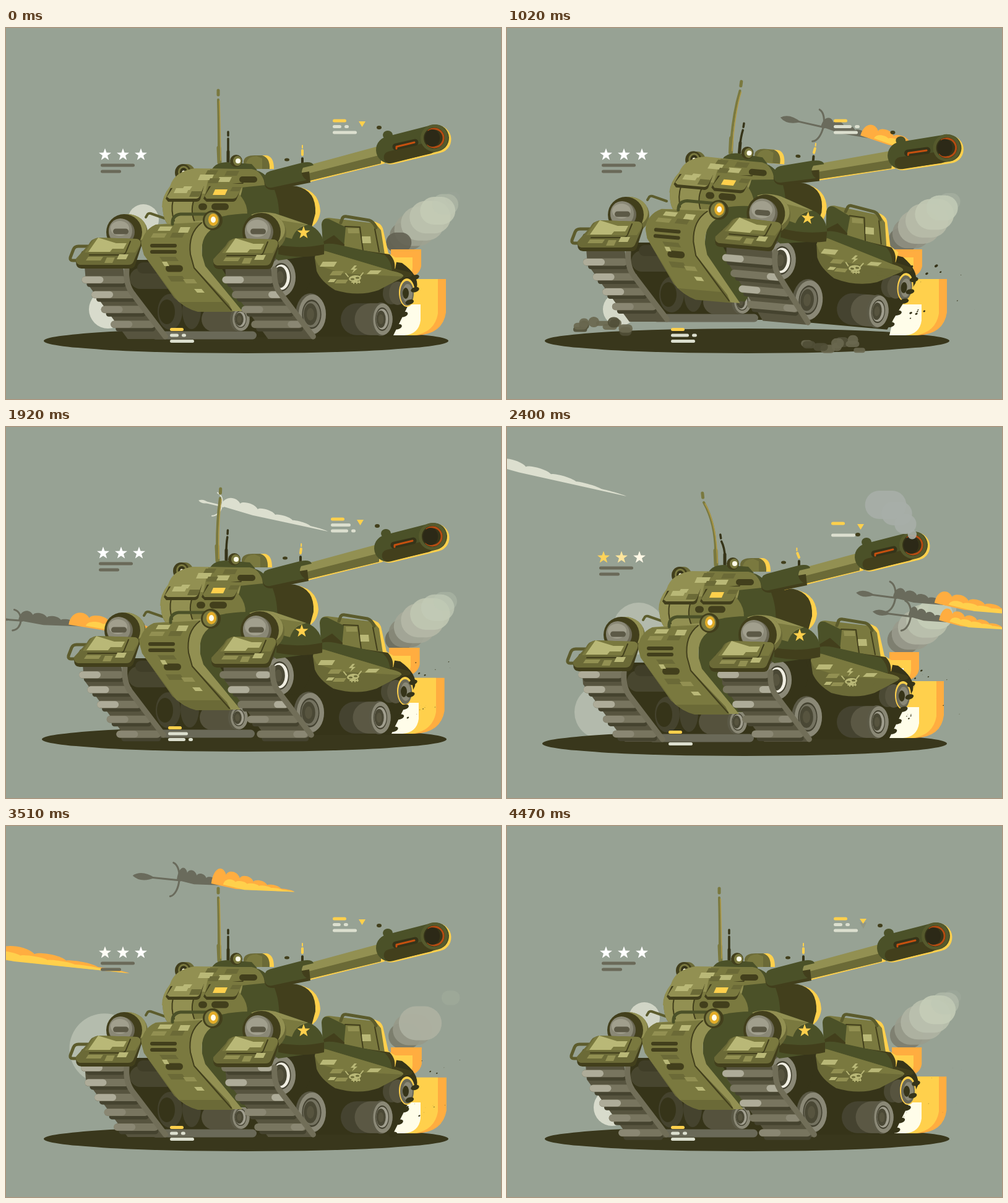
An HTML page with a canvas for the animation above (4.5 s loop, 800 by 600 pixels).

```html
<!DOCTYPE html>
<html>
<head>
<meta charset="utf-8">
<style>
html, body { margin: 0; height: 100%; overflow: hidden; background: #97a294 }
canvas { display: block }
</style>
</head>
<body>
<canvas id="stage" width="800" height="600"></canvas>
<script>
const ctx = document.getElementById('stage').getContext('2d');
const LOOP = 4500, TAU = Math.PI * 2;
const ink = '#363419', deep = '#423f1c', green = '#4b5128', olive = '#7a793f', mid = '#6b6a37',
  light = '#929052', pale = '#b9b877', yellow = '#ffd04c', orange = '#ffad40', cream = '#fffde9',
  mist = '#dcdfcf', soot = '#6a6958', steel = '#8a8876', iron = '#57543f';

// Drawing helpers
const fill = (color, d) => { ctx.fillStyle = color; ctx.fill(new Path2D(d)); };
const line = (color, width, d) => {
  ctx.strokeStyle = color; ctx.lineWidth = width;
  ctx.lineCap = ctx.lineJoin = 'round';
  ctx.stroke(new Path2D(d));
};
const oval = (color, x, y, rx, ry = rx, a = 0) => {
  ctx.fillStyle = color; ctx.beginPath();
  ctx.ellipse(x, y, Math.max(0, rx), Math.max(0, ry), a, 0, TAU); ctx.fill();
};
const pill = (color, x, y, w, h) => {
  if (w < 1) return;
  ctx.fillStyle = color; ctx.beginPath();
  ctx.roundRect(x, y - h / 2, w, h, Math.min(w, h) / 2); ctx.fill();
};
const patch = (color, x, y, w, h, skew = -4) =>
  fill(color, `M${x} ${y}h${w}l${skew} ${h}h${-w}z`);
const star = (color, x, y, r) => {
  ctx.fillStyle = color; ctx.beginPath();
  for (let i = 0; i < 10; i++) {
    const a = i * Math.PI / 5 - Math.PI / 2, q = i % 2 ? r * .4 : r;
    ctx.lineTo(x + q * Math.cos(a), y + q * Math.sin(a));
  }
  ctx.fill();
};
const group = (move, draw) => { ctx.save(); move(); draw(); ctx.restore(); };
const turn = (a, x, y) => { ctx.translate(x, y); ctx.rotate(a); ctx.translate(-x, -y); };
const mix = (a, b, u) => a + (b - a) * u;
const blend = (a, b, u) => `rgb(${a.map((v, i) => Math.round(mix(v, b[i], u)))})`;
const noise = n => { const v = Math.sin(n * 127.1 + 3.7) * 43758.5453; return v - Math.floor(v); };

// Eased interpolation over [time, value] pairs
function key(t, ...k) {
  if (t <= k[0][0]) return k[0][1];
  for (let i = 1; i < k.length; i++) if (t < k[i][0]) {
    const u = (t - k[i - 1][0]) / (k[i][0] - k[i - 1][0]);
    return mix(k[i - 1][1], k[i][1], u * u * (3 - 2 * u));
  }
  return k[k.length - 1][1];
}

const rockets = [
  { at: 1020, x: 443, y: 145, rise: .23, v: 1.2, tilt: .22, neck: 65, len: 290 },
  { at: 1920, x: 0, y: 312, rise: .06, v: .9, tilt: .08, neck: 22, len: 300 },
  { at: 1920, x: 315, y: 120, rise: .205, v: .86, tilt: .235, neck: 33, len: 215, white: true },
  { at: 2400, x: 569, y: 262, rise: .104, v: .83, tilt: .13, neck: 58, len: 290 },
  { at: 2400, x: 596, y: 293, rise: .4, v: 1.14, tilt: .13, bend: .00019, neck: 56, len: 230 },
  { at: 3090, x: 752, y: 217, rise: .25, v: 1.3, tilt: .1, neck: 45, len: 170 }
];

function cloud(color, a, b, h, flat = 0) {
  const n = 6, step = (b - a) / n;
  let d = `M${a} 0`;
  for (let i = 0; i < n; i++) {
    const top = -h * (1 - (i + .4) / n), x = a + step * i;
    d += `C${x + step * .05} ${top * 1.2} ${x + step * .75} ${top * 1.3} ${x + step} ${-h * (1 - (i + 1) / n) * .75}`;
  }
  fill(color, d + `L${b} 0L${a + (b - a) * .3} ${flat}Z`);
}

function rocket(r, t) {
  const gone = r.v * (t - r.at), x = r.x - gone, s = Math.max(.5, 1 + gone * .001);
  const len = r.len * s, g = r.neck * s, trail = len - g;
  if (x > 810 || x + len < -20) return;
  group(() => {
    ctx.translate(x, r.y - gone * r.rise);
    ctx.rotate(r.tilt + (r.bend || 0) * gone);
  }, () => {
    const body = r.white ? mist : '#6a6b5c';
    fill(body, `M0 0Q${g * .2} ${-g * .16} ${g * .52} 0Q${g * .2} ${g * .16} 0 0`);
    line(body, 3, `M${g * .4} 0H${g + 8}`);
    const ry = 12 + g * .22;
    line(body, r.white ? 2 : 3, `M${g - 6} ${-ry}C${g + 10} ${-ry * .8} ${g + 10} ${ry * .8} ${g - 6} ${ry}`);
    if (r.white) return cloud(mist, g + 4, len, 17, 3);
    cloud('#6a6b5c', g + 2, g + trail * .5, 17 * s ** .5, 4);
    cloud(orange, g + trail * .3, len, 21 * s ** .5, 5);
    cloud(yellow, g + trail * .4, len, 8 * s ** .5, 5);
  });
}

function smoke(t) {
  const tones = [[100, 99, 84], [171, 174, 158], [198, 206, 184], [183, 193, 176]];
  for (let k = 24; k >= 0; k--) for (const wrap of [0, LOOP]) {
    const born = k * 187.5, age = (t + wrap - born) / 1350;
    if (age < 0 || age > 1 || (born > 2430 && born < 2850)) continue;
    const band = Math.min(2, Math.floor(age * 3)), r = 8 + 21 * Math.sin(Math.PI * Math.min(1, age * .85 + .14));
    ctx.globalAlpha = Math.min(1, (1 - age) * 3) * .9;
    pill(blend(tones[band], tones[band + 1], age * 3 - band), 634 + 90 * age - r * 1.15, 347 - 74 * age, r * 2.4, r * 1.9);
  }
  // Pale clouds on the far side
  const far = (x, y, r, a) => { ctx.globalAlpha = Math.max(0, a); oval(mist, x, y, r); };
  far(key(t, [0, 165], [1020, 182], [1500, 190], [2100, 165], [2400, 157], [2800, 150], [4000, 180], [4470, 170]),
    455, key(t, [0, 31], [1020, 27], [1600, 8], [2100, 10], [2400, 44], [3000, 50], [3800, 10], [4470, 30]),
    key(t, [0, .95], [1020, .9], [1500, 0], [2100, 0], [2400, .4], [2800, 0], [4000, 0], [4400, .95]));
  far(key(t, [0, 222], [2300, 222], [2700, 190], [3090, 160], [4100, 158], [4300, 222]),
    key(t, [0, 310], [2400, 320], [3090, 360], [4100, 360], [4300, 310]),
    key(t, [0, 25], [700, 10], [2100, 15], [2400, 42], [3090, 56], [4050, 58], [4300, 25]),
    key(t, [0, .85], [700, 0], [2100, 0], [2400, .4], [3090, .6], [3960, .22], [4200, 0], [4440, .85]));
  ctx.globalAlpha = 1;
}

function fire(t) {
  const f = Math.sin(t / LOOP * TAU * 22);
  fill(orange, `M622 358H${671 + f}V385Q668 402 645 405H622Z`);
  fill(yellow, `M622 371H657V388Q655 405 640 408H622Z`);
  fill(cream, `M630 384H645V398H630Z`);
  fill(orange, `M635 ${406 + f}H${711 + f}V460Q706 495 664 497H620Z`);
  fill(yellow, `M635 ${406 + f}H698V462Q693 492 660 497H620Z`);
  fill(cream, `M630 447H670V473Q667 495 644 497H618Z`);
  const power = key(t, [500, 0], [800, 1], [1150, 1], [1700, .5], [2500, .5], [3000, 1], [3500, .5], [3900, .15]);
  for (let i = 0; i < 24; i++) {
    const u = (t / 750 + noise(i)) % 1;
    oval(ink, 632 + 100 * u * (.4 + noise(i + 30)), 492 - 110 * noise(i + 60) - 20 * u,
      (1 - u) * 6 * power * noise(i + 90), (1 - u) * 4 * power * noise(i + 90), -.5);
  }
}

function track(x, width, t) {
  const edge = y => x + Math.max(0, y - 405) * .65;
  fill(iron, `M${x + 6} 385H${x + width - 4}L${x + width} 415L${edge(503) + width} 503H${edge(503) + 12}L${x + 8} 410Z`);
  const run = t * 1056 / LOOP % 48;
  for (let i = -2; i < 5; i++) {
    const y = 383 + run + 24 * i, left = edge(y), side = i % 2 === 0;
    if (y < 387 || y > 499) continue;
    pill('#45432f', left + 8, y + 7, width - 8, 9);
    pill('#78755f', left, y, width, 12);
    pill(y < 455 ? '#aeac99' : '#8a8773', left + (side && x > 300 ? width - 25 : 0), y, side && x > 300 ? 23 : 35, 11);
  }
  line('#716e58', 9, `M${x + width + 2} 390Q${x + width} 415 ${x + width + 12} 430L${edge(498) + width + 4} 499`);
}

function wheel(x, y, rx, ry, back = 0, hub = '#a09e8e') {
  if (back) {
    pill('#454330', x - back - rx, y, back + rx * 2, ry * 1.9);
    pill('#5b5844', x - back * .55 - rx, y, back * .55 + rx * 2, ry * 1.9);
  }
  oval('#5b5946', x - 2, y, rx, ry);
  oval(steel, x + 1, y, rx * .92, ry * .94);
  oval('#444231', x, y, rx * .65, ry * .7);
  oval(hub, x, y, rx * .58, ry * .62);
  oval('#4a4835', x - 2, y, rx * .45, ry * .52);
  oval(iron, x - 2, y, rx * .25, ry * .3);
}

function fender(x, y) {
  group(() => ctx.translate(x, y), () => {
    fill(deep, 'M0 39L10 22L104 2L106 13L96 44Q94 50 87 50H9Q0 50 0 39Z');
    fill(mid, 'M0 34L20 12Q25 1 37 0L98 2Q107 4 104 13L93 39Q91 44 84 44H6Q-1 42 0 34Z');
    fill(olive, 'M36 0L98 2Q107 4 103 13L96 24H14L25 8Q29 1 36 0Z');
    line(deep, 2, 'M22 28H73Q79 28 81 23L88 6');
    fill(pale, 'M36 0L65 9H82L77 18H59L55 23H20Z');
    patch(light, 20, 31, 24, 6); patch(pale, 70, 27, 15, 8); patch(light, 50, 32, 13, 9);
  });
}

function headlight(x, y, r) {
  oval(mid, x + 10, y + 2, r + 12, r + 9);
  oval(light, x + 10, y - 3, r + 10, r + 4);
  oval(deep, x + 5, y + 1, r + 8, r + 8);
  oval('#6b6855', x + 1, y + 1, r, r);
  oval(steel, x - 1, y - 1, r - 2, r - 1);
  oval('#a19f8d', x - 2, y - 5, r - 6, r - 9);
  pill('#5c5946', x - 13, y, 25, 9);
}

function leftSide(t) {
  fill(ink, 'M188 375H420V500H262L205 440Z');
  pill('#48462f', 200, 405, 75, 34); pill('#403e28', 212, 388, 75, 18);
  oval('#45432e', 265, 459, 20, 29); oval(ink, 260, 459, 13, 20); oval('#45432e', 300, 457, 15, 30);
  pill(soot, 235, 497, 170, 13);
  pill('#55523d', 316, 471, 70, 40);
  wheel(379, 471, 15, 20);
  track(121, 72, t);
  line('#5d5c2d', 5, 'M135 353H117Q111 353 109 358L104 371Q103 376 108 376H120');
  headlight(186, 329, 21);
  fender(113, 339);
  line('#5d5d2d', 4, 'M226 306L229 301Q231 299 234 300L257 308');
}

function antennas(bend) {
  const x = 343 + bend;
  line(olive, 7, 'M345 217L344 194');
  line(olive, 4, `M344 196Q344 150 ${x} 116`);
  line('#b09a45', 1.5, `M347 214Q346 150 ${x + 2} 118`);
  line(olive, 5, `M${x + bend * .08} 108L${x + bend * .12} 101`);
  line(ink, 5, 'M359 216V200');
  line(ink, 3.5, `M359 204Q359 190 ${359 + bend * .3} 179`);
  line(ink, 3.5, `M${359 + bend * .35} 174L${359 + bend * .4} 168`);
  line(ink, 4, 'M479 218V211');
  line(yellow, 4, `M479 205L${479 + bend * .15} 198`);
  line(yellow, 2, `M${479 + bend * .2} 194V190`);
}

function gun(recoil) {
  group(() => ctx.translate(-29 * recoil, 7 * recoil), () => {
    line(yellow, 5, 'M485 248L610 217');
    fill(light, 'M470 227L606 190V219L470 252Z');
    fill(mid, 'M470 240L606 205V219L470 252Z');
    line(yellow, 45, 'M623 198L697 180');
    oval(green, 617, 173, 8, 7);
    line(green, 44, 'M620 197L694 178');
    line(deep, 19, 'M620 209L684 194');
    oval('#565a2d', 692, 178, 22);
    oval(ink, 692, 178, 17);
    line('#b64c12', 3, 'M683 166A15 15 0 1 1 682 189');
    oval('#2c2917', 689, 178, 12, 14);
    line(ink, 11, 'M630 192L661 185');
    line('#c5500f', 3, 'M631 195V192L660 185');
    oval(deep, 603, 161, 4, 3);
  });
  fill(deep, 'M418 244L490 232L492 250L432 262Q415 262 418 244Z');
  fill(green, 'M418 240Q420 232 432 230L478 218Q495 215 497 222L480 226Q474 238 486 246L430 258Q415 260 418 240Z');
  oval(deep, 454, 213, 4, 2.5);
}

function turret(bend, recoil) {
  antennas(bend);
  fill(yellow, 'M462 256Q506 258 508 296Q506 316 490 324L440 300Z');
  fill(deep, 'M415 262Q440 252 470 256Q502 263 500 300L494 322H400Z');
  fill(yellow, 'M405 206H421Q433 208 433 228H405Z');
  fill(mid, 'M384 228V215Q386 206 402 206H414Q427 210 426 228Z');
  fill(olive, 'M388 218Q392 207 405 207L414 211V228H390Z');
  fill(green, 'M333 228Q340 217 358 217L397 220L406 230Z');
  oval(mid, 292, 235, 14, 15); oval(deep, 286, 234, 13, 14);
  oval(olive, 287, 233, 9, 10); oval(ink, 287, 233, 6, 7); oval(cream, 287, 233, 2.5);
  fill(green, 'M300 228H395Q425 232 434 262Q445 290 440 330H300Z');
  fill(light, 'M252 290Q252 272 265 256Q272 232 305 227L375 228Q390 246 376 280Z');
  fill(olive, 'M330 228H397Q414 231 419 254L380 258L370 278H320Z');
  fill(olive, 'M253 288Q252 276 262 268H376Q399 292 384 322H267Q254 316 253 288Z');
  fill(light, 'M253 288Q252 276 262 268H304Q296 294 307 320H267Q254 316 253 288Z');
  line(deep, 2, 'M304 278Q296 298 308 320M270 278Q266 296 272 312');
  fill(deep, 'M258 276L266 259L320 255L314 277Q312 281 307 281H262Z');
  fill(light, 'M260 273L271 256Q273 253 279 253H321L313 272Q311 276 307 276H264Z');
  fill(deep, 'M319 276L328 256L384 250L373 276Q371 281 366 281H324Z');
  fill(olive, 'M321 272L331 256Q333 252 338 252H385L373 273Q371 276 366 276H324Z');
  patch(pale, 275, 259, 21, 8); patch(pale, 288, 256, 13, 6); patch(pale, 314, 237, 22, 9);
  patch(mid, 326, 230, 17, 7); patch(pale, 345, 241, 20, 8); patch(mid, 330, 243, 16, 8);
  patch(mid, 357, 231, 20, 8); patch(mid, 366, 257, 15, 7); patch(mid, 300, 264, 17, 9);
  patch(yellow, 338, 261, 20, 9);
  pill(deep, 377, 245, 29, 10);
  pill(deep, 311, 289, 14, 11); pill(deep, 332, 289, 28, 11);
  oval(deep, 372, 215, 10); oval(olive, 374, 215, 7, 8); oval(cream, 375, 215, 4);
  gun(recoil);
}

function hull() {
  fill(green, 'M318 318Q345 300 395 300L440 350L390 455H368L316 385Z');
  fill(light, 'M219 352Q220 328 242 318L320 311Q345 305 345 318Q312 332 317 368L322 385L382 458H310Q290 454 272 436L223 367Z');
  fill(mid, 'M230 377L305 388L360 446L367 459H310Q290 454 272 436Z');
  fill(olive, 'M219 352Q220 328 242 318L318 314Q296 330 298 362L304 389L350 443H279L223 367Z');
  line(deep, 2, 'M316 315Q294 332 298 366L304 388L364 456');
  line(green, 5, 'M269 317Q268 303 282 301H325');
  line(deep, 6, 'M236 352H273M236 362H273');
  pill(deep, 258, 389, 28, 11);
  patch(pale, 249, 321, 20, 7); patch(light, 238, 332, 22, 7); patch(pale, 282, 322, 16, 9);
  patch(mid, 269, 331, 20, 8); patch(mid, 248, 370, 26, 7, 5); patch(pale, 252, 378, 8, 7, 4);
  patch(mid, 261, 401, 24, 9, 6); patch(light, 286, 406, 18, 7, 5); patch(pale, 304, 422, 12, 6, 5);
  oval(deep, 334, 311, 16); oval(olive, 333, 311, 12, 13); oval('#e3ad29', 335, 310, 8, 10); oval(cream, 335, 310, 4, 5);
}

function rightSide(t) {
  fill(ink, 'M345 383L440 350L640 380Q668 400 664 420L625 499H460L400 470Z');
  fill(yellow, 'M592 312Q606 315 609 324L618 364L632 373L628 395L590 370Z');
  fill(olive, 'M510 318Q511 307 522 307L597 316L606 327L612 366L545 364Z');
  fill(green, 'M510 318Q511 306 522 309L549 322L545 366L512 348Z');
  fill(deep, 'M512 346L530 335L547 350L545 368L512 362Z');
  line(deep, 2, 'M548 321L572 322L577 360M596 325L603 362');
  patch(pale, 575, 337, 14, 11, 1); patch(light, 552, 324, 18, 8, 1);
  line('#5b5b2c', 5, 'M541 315L544 307Q546 304 551 305L587 311Q594 313 598 323');
  fill(deep, 'M512 350L620 366Q632 378 627 396L510 380Z');
  fill(green, 'M506 354Q514 346 535 350L612 367Q622 376 624 392L510 368Z');
  wheel(608, 471, 17, 27, 50);
  wheel(494, 463, 24, 34, 0, '#747260');
  oval(ink, 465, 392, 30, 42);
  wheel(445, 403, 24, 33, 0, '#f0eee2');
  oval('#4b4934', 623, 429, 14, 18); oval(iron, 633, 429, 14, 19);
  oval(yellow, 648, 428, 13, 23); oval(soot, 648, 429, 11, 20); oval(steel, 649, 429, 8, 15); oval(ink, 646, 429, 5, 9);
  for (let i = 0; i < 5; i++) {
    const y = 403 + (i * 20 + t * 1056 / LOOP) % 96;
    oval(ink, 661 - Math.max(0, y - 425) * .48, y, 7, 4, -.3);
  }
  fill(deep, 'M628 389L652 395Q660 398 655 402L620 407Z');
  fill(mid, 'M499 372Q501 357 517 361L624 393Q645 397 640 404L602 424Q570 435 532 424Q509 410 502 393Z');
  fill(olive, 'M499 372Q501 357 517 361L624 393Q644 397 642 402L545 397L505 384Z');
  patch(pale, 512, 378, 23, 8, -5); patch(pale, 589, 392, 18, 6, -6); patch(light, 528, 393, 18, 7, -5);
  patch(light, 535, 407, 18, 6); patch(pale, 524, 406, 10, 5); patch(mid, 604, 406, 20, 7, -6);
  // Stencilled emblem
  fill(pale, 'M563 384L557 391H562L559 397L568 389H563L567 384Z');
  line(pale, 2, 'M549 397L553 402M577 396L573 401M559 411L572 411M562 409V413M567 409V413M571 409V412');
  oval(pale, 564, 405, 10, 5, -.12); oval(mid, 560, 406, 3, 1.6); oval(mid, 568, 404, 3, 1.6);
  track(348, 84, t);
  fill(green, 'M395 301Q420 296 448 304L494 320Q518 334 514 365L440 376L405 350Z');
  fill(light, 'M396 302Q412 295 435 300L488 318Q474 321 466 331L437 325Z');
  fill(olive, 'M424 308L488 318Q470 319 462 341L432 333Z');
  fill(deep, 'M440 351Q475 358 514 350V366Q480 374 440 366Z');
  headlight(408, 329, 23);
  star(yellow, 481, 331, 11);
  fender(335, 340);
}

function dust(t) {
  const u = (t - 780) / 560;
  if (u < 0 || u > 1) return;
  ctx.globalAlpha = Math.min(1, (1 - u) * 1.6);
  for (let i = 0; i < 22; i++) {
    const right = i % 2, x = right ? 484 + 95 * noise(i) : 116 + 76 * noise(i);
    const y = (right ? 518 : 488) - 18 * Math.sin(Math.PI * u) * noise(i + 9) + 8 * u;
    pill(i % 3 ? '#69674f' : '#504e37', x - 10, y, 16 + 8 * noise(i + 5), (1 - u * .5) * (10 + 12 * noise(i + 2)));
  }
  ctx.globalAlpha = 1;
}

function muzzleSmoke(t) {
  const u = (t - 2270) / 1100;
  if (u < 0 || u > 1) return;
  const drift = Math.min(1, Math.max(0, (t - 2400) / 690)), grow = Math.min(1, u * 8);
  ctx.globalAlpha = Math.min(1, (1 - u) * 2.2) * .9;
  const puff = (x0, y0, w0, h0, x1, y1, w1, h1) => {
    const w = mix(w0, w1, drift) * grow, h = mix(h0, h1, drift) * grow;
    pill(blend([168, 175, 169], [176, 190, 178], drift), mix(x0, x1, drift) - w / 2, mix(y0, y1, drift), w, h);
  };
  puff(616, 120, 70, 48, 614, 91, 44, 32);
  puff(634, 134, 52, 40, 597, 85, 42, 28);
  puff(648, 151, 37, 34, 580, 80, 40, 20);
  puff(659, 168, 15, 16, 553, 74, 13, 11);
  ctx.globalAlpha = 1;
}

function readout(x, y, t) {
  const a = key(t, [500, 14], [1020, 29], [1920, 32], [2350, 0], [3090, 0], [3600, 14]);
  const dot = key(t, [0, 7], [1300, 8], [1700, 0], [2450, 0], [3000, 7]);
  const b = key(t, [1200, 39], [1850, 28], [2050, 28], [2350, 39]);
  pill(yellow, x, y, 22, 5);
  pill(mist, x, y + 9.5, a, 5); pill(mist, x + a + 5, y + 9.5, dot, 5);
  pill(mist, x, y + 19, b, 5); pill(mist, x + b + 5, y + 19, (39 - b) * .64, 5);
}

function hud(t) {
  const glow = key(t, [2200, 0], [2400, 1], [3090, .75], [3600, 0]);
  [1, .6, .15].forEach((k, i) => star(blend([255, 255, 255], [255, 211, 90], glow * k), 160 + 29 * i, 205, 10.5));
  pill(soot, 153, 222, 55, 5); pill(soot, 153, 232, 33, 5);
  readout(528, 150, t);
  readout(265, 487.5, t);
  const ghost = key(t, [3700, 0], [3950, 1], [4470, 1], [4500, 0]);
  ctx.globalAlpha = ghost * .45;
  fill('#8c8a70', 'M570 156H581L576 166Z');
  ctx.globalAlpha = key(t, [700, 1], [950, 0], [1200, 0], [1500, 1]);
  fill(yellow, `M570 ${151 - ghost}H581L575.5 ${160 - ghost * 2}Z`);
  ctx.globalAlpha = 1;
}

function render(t) {
  ctx.fillStyle = '#97a294';
  ctx.fillRect(0, 0, 800, 600);
  const shakeX = key(t, [1640, 0], [1720, 3], [1820, -4], [1920, -3], [2040, 2], [2150, 0], [2280, 0], [2400, -4], [2520, 3], [2620, -1], [2700, 0]);
  const shakeY = key(t, [1640, 0], [1720, 7], [1820, -3], [1920, -1], [2040, 2], [2150, 0], [2280, 0], [2330, 8], [2400, 6], [2520, -3], [2620, 1], [2700, 0]);
  const lift = key(t, [640, 0], [900, 1.04], [1020, 1], [1280, .9], [1480, -.04], [1580, 0]);
  const recoil = key(t, [2280, 0], [2340, 1.15], [2400, 1], [2720, 0]);
  const bend = key(t, [650, 0], [850, -8], [1020, 8], [1300, -8], [1550, 7], [1750, -7], [1920, 6], [2150, 0], [2290, 0], [2400, -18], [2540, 12], [2680, -6], [2820, 0]);
  group(() => ctx.translate(shakeX, shakeY), () => {
    smoke(t);
    rockets.forEach(r => rocket(r, t));
    oval('#39371c', 388, 506, 327, 20);
    fire(t);
    group(() => ctx.translate(lift - 2 * recoil, -28 * lift), () => leftSide(t));
    group(() => { ctx.translate(-3 * recoil, 0); turn(.09 * lift, 525, 392); }, () => { turret(bend, recoil); hull(); });
    group(() => { ctx.translate(-4 * recoil, 0); turn(.09 * lift, 745, 375); }, () => rightSide(t));
    dust(t);
    muzzleSmoke(t);
    hud(t);
  });
}

const start = performance.now();
function tick() {
  render((performance.now() - start) % LOOP);
  requestAnimationFrame(tick);
}
tick();
</script>
</body>
</html>
```
